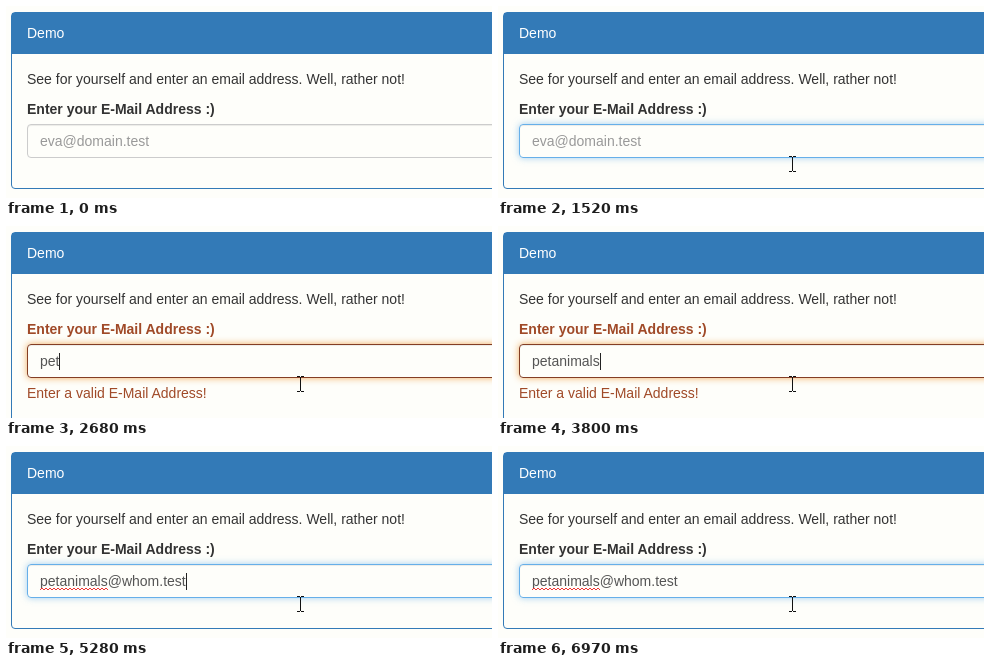
Recreate the animation shown at these times as an HTML page. Size 486x192 px, loop 7.05 s.

```html
<!DOCTYPE html>
<html lang="en">
<head>
<meta charset="utf-8">
<title>E-mail validation demo</title>
<style>
  * { box-sizing: border-box; }
  html, body { margin: 0; width: 486px; height: 192px; overflow: hidden; }
  body { position: relative; background: #fefefa; color: #333;
    font: 14px/20px "Liberation Sans", Arial, Helvetica, sans-serif; }
  .panel { position: absolute; left: 5px; top: 6px; width: 560px;
    border: 1px solid #337ab7; border-radius: 4px; }
  .head { height: 41px; padding: 10px 15px; background: #337ab7; color: #fff; }
  .body { padding: 15px; }
  p { margin: 0 0 10px; }
  .group { margin-bottom: 15px; }
  b { display: block; margin-bottom: 5px; }
  .input { position: relative; height: 34px; padding: 6px 12px; border: 1px solid;
    border-radius: 4px; color: #555; white-space: pre; }
  .hint { position: absolute; color: #999; }
  .caret { position: absolute; top: 8px; width: 1px; height: 17px; background: #222; }
  .help { display: none; margin: 5px 0 10px; }
  .bad b, .bad .help { color: #a04a28; }
  .bad .help { display: block; }
  svg { position: absolute; overflow: visible; fill: none; }
  .wave { left: 12px; top: 23px; stroke: #e33; }
  .mouse { left: 0; top: 0; stroke: #111; }
</style>
</head>
<body>
<div class="panel">
  <div class="head">Demo</div>
  <div class="body">
    <p>See for yourself and enter an email address. Well, rather not!</p>
    <div class="group" id="group">
      <b>Enter your E-Mail Address :)</b>
      <div class="input" id="input"><span class="hint" id="hint">eva@domain.test</span><span id="text"></span><i class="caret" id="caret"></i><svg class="wave" id="wave" width="68" height="3"><path/></svg></div>
      <div class="help">Enter a valid E-Mail Address!</div>
    </div>
  </div>
</div>
<svg class="mouse" id="mouse" width="1" height="1"><path d="M-3 -7.5h3m1 0h3M.5 -7V7M-3 7.5h3m1 0h3"/></svg>
<script>
const LOOP = 7050, FOCUS = 800, BLINK = 530;
const WORD = "petanimals@whom.test";
const KEYS = [2080, 2300, 2520, 2880, 3040, 3200, 3360, 3480, 3600, 3720,
  3960, 4040, 4110, 4180, 4240, 4300, 4360, 4600, 4800, 5000];
const INVALID = KEYS[0], VALID = KEYS[18];

// Border and glow colours (rgba) of the input
const REST = [204, 204, 204, 1, 102, 175, 233, 0];
const BLUE = [102, 175, 233, 1, 102, 175, 233, 0.6];
const RED = [132, 62, 36, 1, 240, 165, 80, 0.9];
const CHANGES = [[FOCUS, BLUE], [INVALID, RED], [VALID, BLUE]];

const { group, input, hint, text, caret, wave, mouse } =
  Object.fromEntries([...document.querySelectorAll("[id]")].map(e => [e.id, e]));
const clamp = x => Math.max(0, Math.min(1, x));
const show = (el, on) => el.style.visibility = on ? "visible" : "hidden";

wave.firstChild.setAttribute("d", "M0 2" + "l2 -2l2 2".repeat(17));

function inputColours(t) {
  return CHANGES.reduce((from, [start, to]) => {
    const k = clamp((t - start) / 150);
    return from.map((v, i) => v + (to[i] - v) * k);
  }, REST);
}

function draw(t) {
  const typed = KEYS.filter(k => k <= t).length;
  const c = inputColours(t);
  group.className = t >= INVALID && t < VALID ? "group bad" : "group";
  input.style.borderColor = `rgba(${c.slice(0, 4)})`;
  input.style.boxShadow =
    `inset 0 1px 1px rgba(0,0,0,.075), 0 0 7px rgba(${c.slice(4)})`;

  text.textContent = WORD.slice(0, typed);
  show(hint, !typed);
  show(wave, typed > 10);
  const last = typed ? KEYS[typed - 1] : FOCUS;
  show(caret, t >= FOCUS && (t - last) % (2 * BLINK) < BLINK);
  caret.style.left = 12 + Math.round(text.getBoundingClientRect().width) + "px";

  // The pointer glides in from the lower right
  const away = (1 - clamp((t - 320) / 400)) ** 3;
  show(mouse, t >= 320);
  mouse.style.transform =
    `translate(${Math.round(294 + 70 * away)}px, ${Math.round(158 + 45 * away)}px)`;
}

function tick() {
  draw(performance.now() % LOOP);
  requestAnimationFrame(tick);
}
tick();
</script>
</body>
</html>
```
